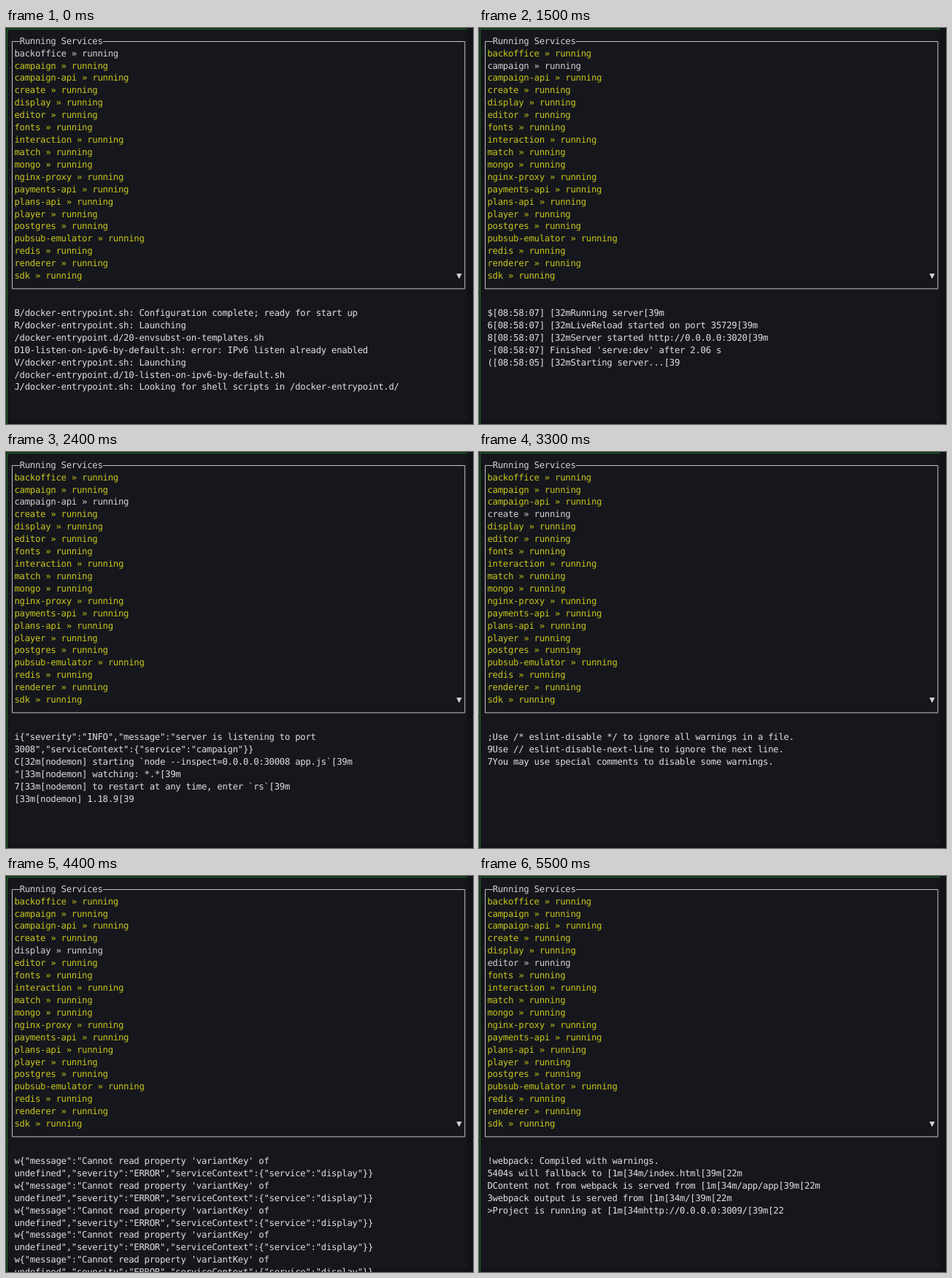
Animation of 640x542 px, one loop 5900 ms. Source, as an HTML page:

```html
<!DOCTYPE html>
<html lang="en">
<head>
<meta charset="utf-8">
<title>Running Services</title>
<style>
html, body { margin: 0; width: 100%; height: 100%; overflow: hidden; background: #15171c; }
svg { display: block; width: 640px; height: 542px; }
text { font: 12.3px "DejaVu Sans Mono", monospace; letter-spacing: -.28px; text-rendering: geometricPrecision; fill: #e0e0e0; }
.item { fill: #c8c51a; }
.item.on, .title { fill: #d2d2d2; }
.box { fill: none; stroke: #c4c4c4; }
.pane { fill: none; stroke: #1c741f; }
</style>
</head>
<body>
<svg viewBox="0 0 640 542">
  <path fill="#111217" d="M632 0h8v542H0v-4h632z"/>
  <path class="pane" d="M632 1.5H1.5V542M0 356.5H1.5"/>
  <path class="box" d="M19 18.5H8.5V356.9H628.8V18.5H133"/>
  <g id="list"></g>
  <g id="log"></g>
</svg>
<script>
const LOOP = 5900, ROW = 16.92, COL = 7.125;
const names = `backoffice campaign campaign-api create display editor fonts interaction match mongo
nginx-proxy payments-api plans-api player postgres pubsub-emulator redis renderer sdk`.split(/\s+/);

const logs = [
`B/docker-entrypoint.sh: Configuration complete; ready for start up
R/docker-entrypoint.sh: Launching
/docker-entrypoint.d/20-envsubst-on-templates.sh
D10-listen-on-ipv6-by-default.sh: error: IPv6 listen already enabled
V/docker-entrypoint.sh: Launching
/docker-entrypoint.d/10-listen-on-ipv6-by-default.sh
J/docker-entrypoint.sh: Looking for shell scripts in /docker-entrypoint.d/`,
`$[08:58:07] [32mRunning server[39m
6[08:58:07] [32mLiveReload started on port 35729[39m
8[08:58:07] [32mServer started http://0.0.0.0:3020[39m
-[08:58:07] Finished 'serve:dev' after 2.06 s
([08:58:05] [32mStarting server...[39`,
`i{"severity":"INFO","message":"server is listening to port
3008","serviceContext":{"service":"campaign"}}
C[32m[nodemon] starting \`node --inspect=0.0.0.0:30008 app.js\`[39m
"[33m[nodemon] watching: *.*[39m
7[33m[nodemon] to restart at any time, enter \`rs\`[39m
[33m[nodemon] 1.18.9[39`,
`;Use /* eslint-disable */ to ignore all warnings in a file.
9Use // eslint-disable-next-line to ignore the next line.
7You may use special comments to disable some warnings.`,
`w{"message":"Cannot read property 'variantKey' of
undefined","severity":"ERROR","serviceContext":{"service":"display"}}
`.repeat(5).trim(),
`!webpack: Compiled with warnings.
5404s will fallback to [1m[34m/index.html[39m[22m
DContent not from webpack is served from [1m[34m/app/app[39m[22m
3webpack output is served from [1m[34m/[39m[22m
>Project is running at [1m[34mhttp://0.0.0.0:3009/[39m[22`
];

// Times at which the selection moves down and at which its log arrives
const selectAt = [200, 1800, 2800, 3700, 5100];
const logAt = [400, 2400, 3300, 4400, 5500];
const list = document.getElementById("list"), log = document.getElementById("log");

function put(parent, str, row, col = 0, cls = "") {
  const t = document.createElementNS("http://www.w3.org/2000/svg", "text");
  t.setAttribute("x", 11.5 + col * COL);
  t.setAttribute("y", 38.6 + row * ROW);
  t.setAttribute("class", cls);
  t.textContent = str;
  parent.append(t);
  return t;
}

const items = names.map((n, i) => put(list, n + " » running", i, 0, "item"));
put(list, "Running Services", -1, 1, "title");
put(list, "▼", 18, 85, "title");
const pages = logs.map(s => {
  const g = log.appendChild(document.createElementNS("http://www.w3.org/2000/svg", "g"));
  s.split("\n").forEach((line, i) => put(g, line, 21 + i));
  return g;
});

const passed = (times, t) => times.filter(x => x <= t).length;

function draw(now) {
  const t = now % LOOP, sel = passed(selectAt, t), page = passed(logAt, t);
  items.forEach((el, i) => el.classList.toggle("on", i === sel));
  pages.forEach((g, i) => g.style.display = i === page ? "" : "none");
}

const start = performance.now();
function tick() {
  draw(performance.now() - start);
  requestAnimationFrame(tick);
}
tick();
</script>
</body>
</html>
```
